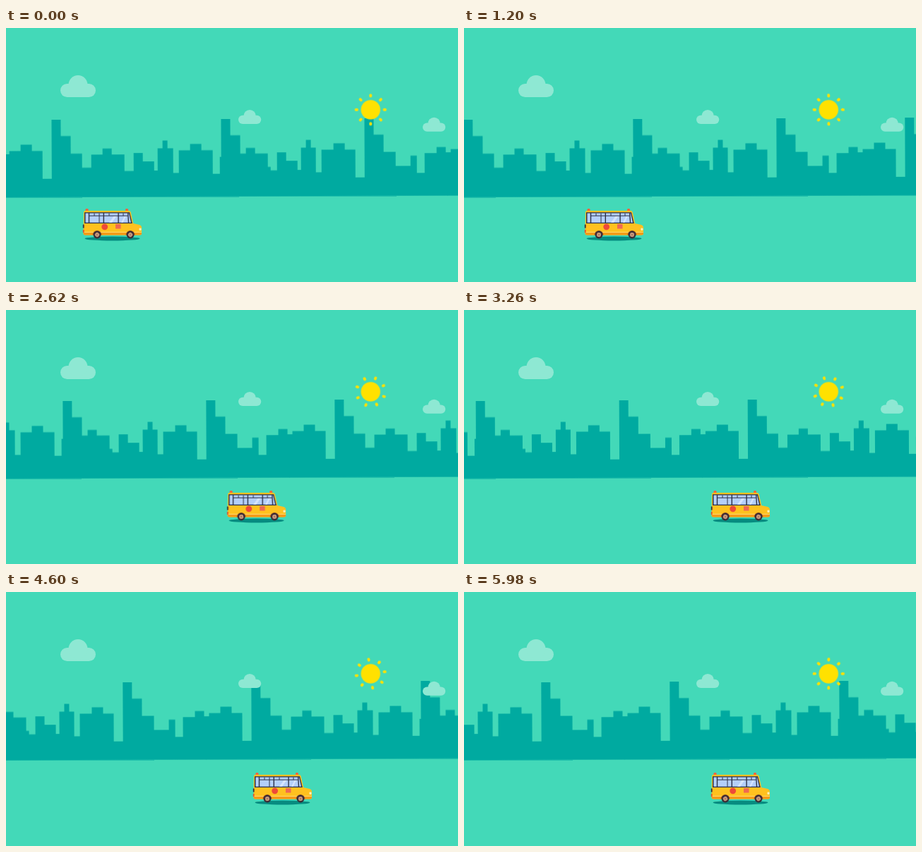
An HTML page that plays this animation: 640x360 px, repeating every 6 s.

```html
<!DOCTYPE html>
<html lang="en">
<head>
<meta charset="utf-8">
<title>School bus ride</title>
<style>
  html, body { margin: 0; width: 100%; height: 100%; overflow: hidden; background: #43d9b8; }
  svg { display: block; width: 100vw; height: 100vh; }

  .city, .bus, .rays { animation: 6s linear infinite; }
  .city { animation-name: pan; }
  .bus { animation-name: drive; }
  .rays { animation-name: turn; }
  .hub { animation: roll 0.6s linear infinite; }

  @keyframes pan {
    0% { transform: translateX(0); }
    31% { transform: translateX(-101px); }
    43.667% { transform: translateX(-224px); }
    48.87% { transform: translateX(-274.5px); }
    66.333% { transform: translateX(-317px); }
    100% { transform: translateX(-399px); }
  }
  @keyframes drive {
    0% { transform: translateX(0); }
    31% { transform: translateX(96px); }
    48%, 100% { transform: translateX(241px); }
  }
  @keyframes turn {
    0% { transform: rotate(0deg); }
    31% { transform: rotate(-70deg); }
    100% { transform: rotate(-316deg); }
  }
  @keyframes roll { to { transform: rotate(360deg); } }
</style>
</head>
<body>
<svg viewBox="0 0 640 360" preserveAspectRatio="none">
  <defs>
    <!-- One 625 px stretch of skyline; it repeats seamlessly -->
    <path id="block" d="M0 240.6V179H5V174.5H21V165.5H37V174.5H52V214H65V130H78V153.5H92V178.5
      H108V198.5H121V180H137V171.5H150V180H168V203.5H181V178H194V190H210V203H215V171.5H222V160.5
      H229V171.5H237V206.5H245V174.5H261V165.5H277V174.5H293V208H303V184H305V130H318V153.5H332V179.5
      H340V171.5H353V179.5H371V198.5H375V203.5H384V178H397V190H413V203H418V171.5H425V160.5H432V171.5
      H439V206.5H447V174.5H464V165.5H480V174.5H495V214H508V130H521V153.5H535V178H552V198H573V183.5
      H582V208H593V180H610V171.5H623V179H625.5V240.6Z"/>
    <g id="cloud" fill="#8ee8d3">
      <rect y="12" width="50" height="19" rx="9.5"/>
      <circle cx="25" cy="13.5" r="13.5"/>
    </g>
    <rect id="ray" x="-1.9" y="-22.6" width="3.8" height="5.2" rx="1.9"/>
    <g id="rayPair">
      <use href="#ray"/>
      <use href="#ray" transform="rotate(180)"/>
    </g>
    <g id="wheel">
      <circle r="5.4" fill="#3a2b35"/>
      <g class="hub">
        <circle r="3" fill="#e9b58f"/>
        <path d="M-2.4 0H2.4M0-2.4V2.4" stroke="#8a5a4c" stroke-width=".8"/>
      </g>
    </g>
    <g id="beacon">
      <path d="M-2 2.5V-.3Q-2-1.5 0-1.5T2-.3V2.5Z" fill="#f4633a"/>
      <rect x="-2.8" y="1.6" width="5.6" height="1.4" fill="#f9a51a"/>
    </g>
  </defs>

  <rect width="640" height="360" fill="#43d9b8"/>

  <g class="city" fill="#00aaa0">
    <g transform="rotate(-.258 0 240.6)">
      <use href="#block"/>
      <use href="#block" x="625"/>
    </g>
  </g>

  <g transform="translate(516.3 115.8)" fill="#ffe100">
    <circle r="13.7"/>
    <g class="rays">
      <use href="#rayPair"/>
      <use href="#rayPair" transform="rotate(45)"/>
      <use href="#rayPair" transform="rotate(90)"/>
      <use href="#rayPair" transform="rotate(135)"/>
    </g>
  </g>

  <use href="#cloud" transform="translate(77 67)"/>
  <use href="#cloud" transform="translate(329 116) scale(.645)"/>
  <use href="#cloud" transform="translate(590 126.7) scale(.645)"/>

  <g class="bus">
    <ellipse cx="150.5" cy="298.5" rx="39" ry="3" fill="#078b80"/>
    <use href="#beacon" x="114.5" y="257.5"/>
    <use href="#beacon" x="171" y="257.5"/>
    <path d="M110 261Q110 259 112 259H174Q176 259 176.6 261L180.2 277L189 279Q192 280 192 283V291
      Q192 293.5 189.5 293.5H112Q109.5 293.5 109.5 291Z" fill="#ffc11f"/>
    <path d="M109.6 290H192V291Q192 293.5 189.5 293.5H112Q109.6 293.5 109.6 291Z" fill="#f59a17"/>
    <path d="M110 289.4H192" stroke="#ffe08a" stroke-width=".8"/>

    <!-- Windows -->
    <path d="M111 261.3H175L178.8 277H111Z" fill="#2c3047"/>
    <path d="M112.5 262.6H116.8V275.8H112.5ZM118.2 262.6H137.6V275.8H118.2ZM139 262.6H158.4V275.8H139Z
      M159.8 262.6H172L172.8 275.8H159.8ZM173.4 262.6H174L177 275.8H174.2Z" fill="#b4cffa"/>
    <path d="M146 275.8L153 266H157L150 275.8ZM163 275.8L168 266H170.5L165.5 275.8Z" fill="#d5e4ff"/>
    <path d="M118 266.2H172.5M125 262.5V266M132 262.5V275.8M146 262.5V266M166 262.5V266"
      stroke="#2c3047" stroke-width="1"/>

    <!-- Side badges -->
    <circle cx="139.7" cy="281.8" r="4.4" fill="#ee4a38"/>
    <rect x="155" y="278" width="7.5" height="6.5" fill="#ef6a52"/>

    <rect x="108.8" y="278.5" width="1.8" height="5" fill="#3a2b35"/>
    <rect x="108.8" y="286" width="1.8" height="4" fill="#e5532d"/>
    <rect x="188.5" y="283.5" width="3" height="3.5" rx="1" fill="#fff0bd"/>
    <path d="M122.5 293.5A6.5 6.5 0 0 1 135.5 293.5ZM169.5 293.5A6.5 6.5 0 0 1 182.5 293.5Z" fill="#a65a1d"/>
    <g transform="translate(129 293)"><use href="#wheel"/></g>
    <g transform="translate(176 293)"><use href="#wheel"/></g>
  </g>
</svg>
</body>
</html>
```
